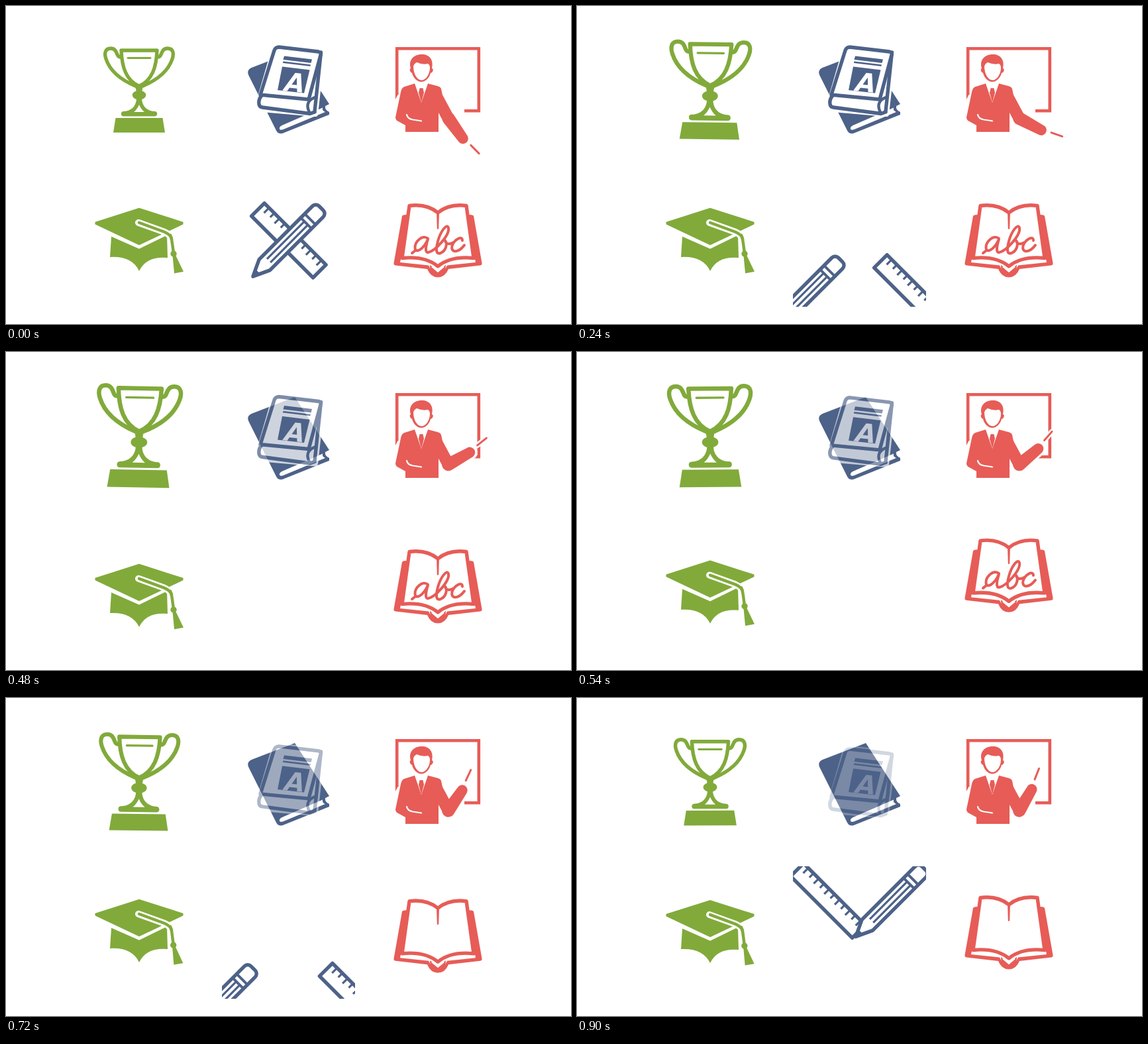
An HTML page for the animation above (0.96 s loop, 853 by 480 pixels).

```html
<!DOCTYPE html>
<html lang="en">
<head>
<meta charset="utf-8">
<title>Education icons</title>
<style>
html, body { margin: 0; width: 100%; height: 100%; overflow: hidden; background: #fff; }
svg { display: block; width: 853px; height: 480px; }
.g { --c: #81aa3b; }
.b { --c: #4d6288; }
.r { --c: #e75c57; }
.f { fill: var(--c); }
.w { fill: #fff; }
.s, .ws { fill: none; stroke: var(--c); stroke-width: 5.4; stroke-linecap: round; stroke-linejoin: round; }
.ws { fill: #fff; }
.cut { stroke-linecap: butt; }
.halo { fill: #fff; stroke: #fff; stroke-width: 8; stroke-linejoin: round; stroke-linecap: round; }
</style>
</head>
<body>
<svg viewBox="0 0 853 480" xmlns="http://www.w3.org/2000/svg">
  <defs>
    <clipPath id="capTile"><rect x="101" y="254" width="201" height="200"/></clipPath>
    <clipPath id="toolTile"><rect x="326" y="254" width="201" height="200"/></clipPath>
    <clipPath id="bookTile"><rect x="551" y="254" width="201" height="200"/></clipPath>
  </defs>

  <g class="g" id="trophy">
    <path id="handle" class="s" d="M172 77 C166 77 169 64 158 64 C150 64 148 71 151 80 C157 98 172 111 196 121"/>
    <use href="#handle" transform="translate(402) scale(-1 1)"/>
    <path class="ws" d="M174 67 H228 C227 92 221 112 201 121 C181 112 175 92 174 67Z"/>
    <path class="s" style="stroke-width:2.8" d="M184 78.500 H218"/>
    <path class="f" d="M195 120 H207 L205 130 H197Z"/>
    <ellipse class="f" cx="201" cy="134.500" rx="10.300" ry="7"/>
    <path class="f" d="M197 139 H205 C205 152 214 159 225 159 A3.800 3.800 0 0 1 225 166.500 H177 A3.800 3.800 0 0 1 177 159 C188 159 197 152 197 139Z"/>
    <path class="w" d="M201 149 Q204 156 209 160 H193 Q198 156 201 149Z"/>
    <path class="f" d="M165.500 169 H236.500 L240 191 H162Z"/>
  </g>

  <g class="b">
    <path class="f" d="M371 93 L436 68 L488 148 L482 151 Q481 157 488 160 L488 164 L418 192 Q411 194 408 188 L367 106 Q362 97 371 93Z"/>
    <path class="w" d="M417 180 L478 153.500 Q477 158 482 160 L418 186.500 Q412 188 413 183.500 Q414 181 417 180Z"/>
    <g id="front">
      <path class="halo" d="M411 61 L474 68 Q478 69 477 74 L467 163 L386 156 Q380 153 382 144 L404 68 Q406 61 411 61Z"/>
      <path class="s" d="M475.500 70 L466 159"/>
      <path class="s" d="M387 134 C380 141 380 152 387 153 L459 162.500 L466 160"/>
      <path class="s" style="stroke-width:4.400" d="M466 138 C454 143 453 152 459 162"/>
      <path class="ws" d="M412 62 L472 69 Q476 70 475 74 L457 141 L384 134 L405 67 Q407 62 412 62Z"/>
      <path class="f" d="M420 75.500 L462 80.500 L460.500 86 L418.500 81Z M418.500 83.500 L460 88.500 L459.300 91 L417.800 86Z M417 91.500 L458.500 96.500 L450 131.500 L410 127Z"/>
      <text class="w" transform="translate(417 127.500) rotate(6) skewX(-12)" font-family="'DejaVu Sans', sans-serif" font-weight="700" font-size="39">A</text>
    </g>
  </g>

  <g class="r">
    <path fill="none" stroke="var(--c)" stroke-width="4.600" d="M590.200 134 V64.300 H713.800 V158.300 H692"/>
    <path class="f" d="M587.900 132 H592.500 L587.900 141Z"/>
    <path class="f" d="M611 94 C607 80 617 73 628 73 C639 73 646 81 643 94 Q646 95 644 99 Q643 101 641 101 C639 109 633 114.500 627 114.500 C621 114.500 615 109 613 101 Q611 101 610 98 Q609 95 611 94Z"/>
    <path class="w" d="M615 91 Q616 87 620 85 Q629 89 637 87 Q640 89 640 93 C640 104 633 112 627.500 112 C621 112 615 103 615 91Z"/>
    <path class="f" d="M617 117 L601 122 Q597 124 596 130 L588 168 Q588 172 592 174 L603 180 V190 H653 V158 L660 140 L657 125 Q656 122 652 121 L637 117 L627 146Z"/>
    <path class="f" d="M624.500 124 H629.500 L631 131 L627 146 L623 131Z"/>
    <path fill="none" stroke="#fff" stroke-width="2.200" stroke-linecap="round" d="M605 164 Q606 170 614 171.500 L627 173.500"/>
    <g id="armHalo">
      <path class="halo" style="stroke-width:7" d="M14 -8 L37 -5 A8 8 0 0 1 37 11 L14 9Z"/>
      <path class="halo" d="M52 .6 L70 -.6"/>
    </g>
    <path fill="none" stroke="var(--c)" stroke-width="18" d="M646 129 L668 170"/>
    <g id="arm">
      <path class="f" d="M0 -10 L37 -5 A8 8 0 0 1 37 11 L0 9.500 A9.750 9.750 0 0 1 0 -10Z"/>
      <path class="s" style="stroke-width:3" d="M52.500 .6 L70 -.6"/>
    </g>
  </g>

  <g class="g" clip-path="url(#capTile)">
    <g id="cap">
      <path class="f" d="M159 348 L201 366.500 L243 346 L244 380 Q212 377 201 400 Q190 377 157 379Z"/>
      <path class="f" d="M134.500 326 L201 304.800 L267.500 326 V329.500 L201 361 L134.500 329.500Z"/>
      <path fill="none" stroke="#fff" stroke-width="10" stroke-linecap="round" d="M200 327 L239 341 Q249 345 250 354 L252 370"/>
      <path class="s" style="stroke-width:4.500" d="M201 327 L239 341 Q249 345 250 352"/>
      <g id="tassel">
        <path class="s" style="stroke-width:4.500" d="M248 346 Q250 350 250.500 355 L253 373"/>
        <circle class="f" cx="253" cy="374" r="4.700"/>
        <path class="f" d="M251.500 377 L256 376 L268 401 L254 403.500Z"/>
      </g>
    </g>
  </g>

  <g class="b" clip-path="url(#toolTile)">
    <g id="ruler">
      <rect class="ws" x="-66" y="-13.800" width="131.500" height="27.600"/>
      <path id="ticks" class="s cut" style="stroke-width:3.200"/>
    </g>
    <g id="pencil">
      <path class="ws" d="M-76.500 0 L-52 -11.500 H62 A7 7 0 0 1 69 -4.500 V4.500 A7 7 0 0 1 62 11.500 H-52Z"/>
      <path class="f" d="M-80 0 L-66 -6 V6Z"/>
      <path class="s cut" style="stroke-width:3.200" d="M-43 -3.700 H37 M-43 3.700 H37"/>
      <path class="s cut" style="stroke-width:4" d="M37 -11 V11 M45.500 -11 V11"/>
    </g>
  </g>

  <g class="r" clip-path="url(#bookTile)">
    <g id="book">
      <path class="f" d="M598 317 Q599 315 605 315 L598 380 L640 391 Q642 405 652 405 Q662 405 664 391 L706 380 L699 315 Q705 315 706 317 L718.500 388 Q719 391 716 391.500 L668 397 Q663 409.500 652 409.500 Q641 409.500 636 397 L588 391.500 Q585 391 585.500 388Z"/>
      <path class="w" d="M596 382 Q630 380 652 398 Q674 380 708 382 L709 387 L666 391.500 Q662 402 652 402.500 Q642 402 638 391.500 L595 387Z"/>
      <path class="f" d="M640 391 L652 399 L664 391 Q664 406 652 406 Q640 406 640 391Z"/>
      <path fill="none" stroke="#fff" stroke-width="2.500" d="M643 393 L652 400.500 L661 393"/>
      <path class="ws" d="M609 301.500 Q635 298 652 312 Q669 298 695 301.500 L706 380.500 Q671 377 652 393 Q633 377 598 380.500Z"/>
      <path class="f" d="M650 311 H654 L653.200 336 Q652 338 650.800 336Z"/>
      <path id="abc" class="s" style="stroke-width:4" d="M613 373 L618 369 M637 351 C629 344 617 356 617.500 365 C618 374 630 368 637 352 C634 362 632 372 637 372 C648 370 670 346 668 335 C666 327 656 340 652 355 C648 370 650 375 656 373 C664 370 667 359 663 354 C664 360 670 360 675 357 M689 354 C689 346 677 352 673.500 362 C671 372 682 374 692 361"/>
    </g>
  </g>
</svg>
<script>
const LOOP = 960, STEP = 60, TAU = 2 * Math.PI;
const { sin, cos, exp, tanh, max } = Math;
const el = id => document.getElementById(id);
const move = (id, v) => el(id).setAttribute('transform', v);

// Leap up, dip below the rest line, settle; u is ms since take-off
const hop = u => u < 0 ? 0 : -3.5 * u * exp(-u / 64.6) * sin(TAU * u / 380);

// Tassel swing after the landing
const sway = u => u < 0 ? 0 : 3.4 * exp(-u / 300) * sin(TAU * u / 300);

// Tools glide out at constant speed, then rush back in and slow down
const slide = t => t < 600 ? .325 * t : 89 * ((900 - t) / 120) ** 1.3 - 48;

let ticks = '';
for (let i = 0; i < 11; i++) ticks += `M${-56 + i * 11.2} -13v${i % 2 ? 8 : 10}`;
el('ticks').setAttribute('d', ticks);

function draw(t) {
  const swell = max(0, sin(Math.PI * t / 920)) ** .85;
  const tilt = swell * (1.5 * cos(TAU * t / 240) - .4);
  move('trophy', `translate(201 126) rotate(${tilt}) scale(${1 + .205 * swell}) translate(-201 -126)`);

  const fade = max(0, (t - 240) / 660);
  move('front', `translate(0 ${15 * fade})`);
  el('front').setAttribute('opacity', 1 - .75 * fade);

  const arm = `translate(668 170) rotate(${-5.7 - 60 * tanh((t - 360) / 230)})`;
  move('arm', arm);
  move('armHalo', arm);

  move('cap', `translate(0 ${hop(t - 240)})`);
  move('tassel', `rotate(${sway(t - 585)} 248 346)`);

  const d = slide(t);
  move('ruler', `translate(${427 + d} ${354 + d}) rotate(45)`);
  move('pencil', `translate(${427 - d} ${354 + d}) rotate(-45)`);

  move('book', `translate(0 ${hop(t - 520)})`);
  el('abc').setAttribute('visibility', t < 600 ? 'visible' : 'hidden');
}

const start = performance.now();
function tick() {
  const t = (performance.now() - start) % LOOP;
  draw(Math.floor(t / STEP) * STEP);
  requestAnimationFrame(tick);
}
tick();
</script>
</body>
</html>
```
